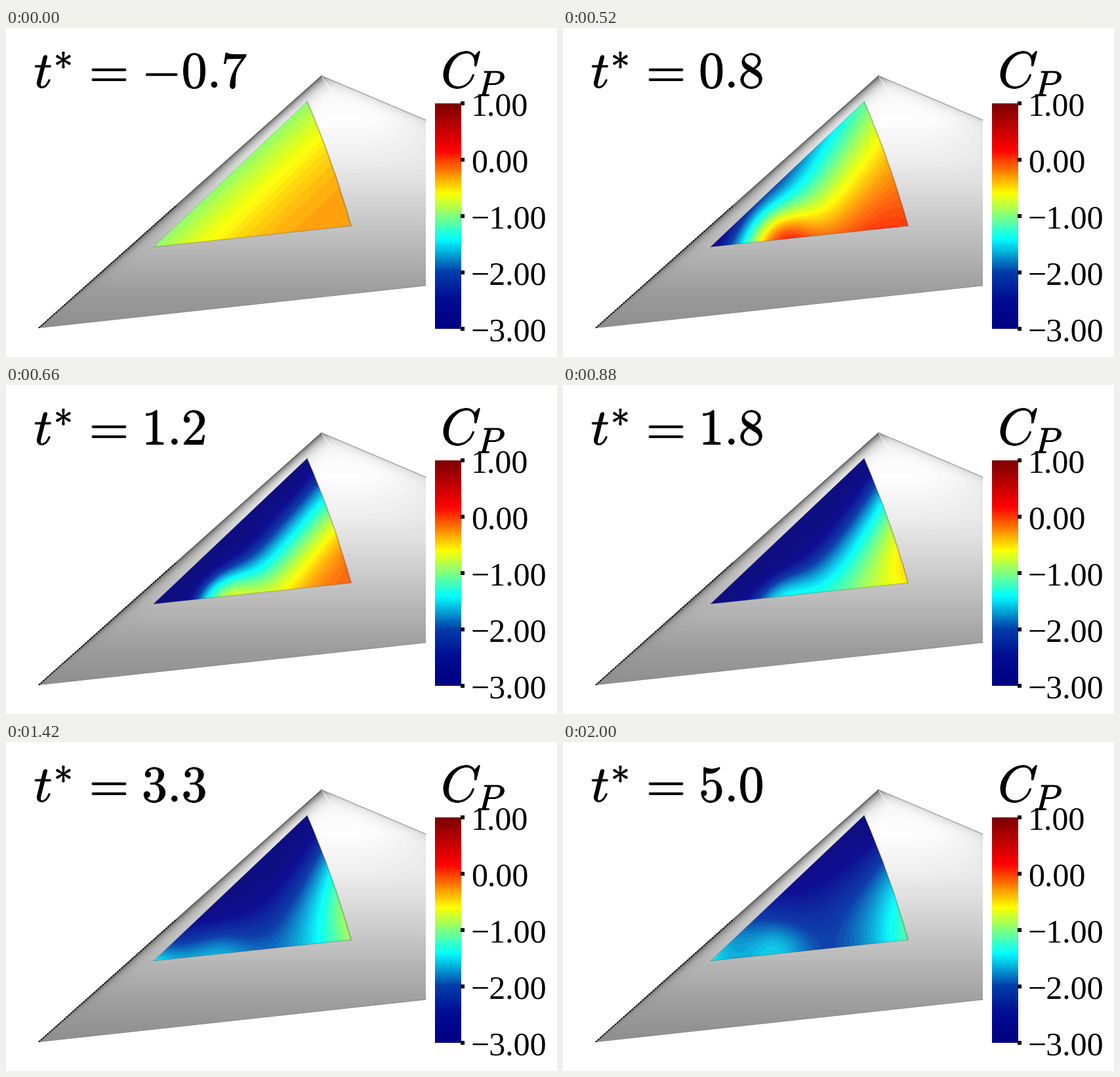
Write a matplotlib script that moves like this. It is 840 by 502 pixels and loops after 2020 ms.

```python
import numpy as np
import matplotlib.pyplot as plt
from matplotlib.animation import FuncAnimation
from matplotlib.colors import LinearSegmentedColormap
from matplotlib.patches import PathPatch, Polygon, Rectangle
from matplotlib.path import Path
from matplotlib.patheffects import withStroke

W, H, DPI = 840, 502, 64
FRAMES, STEP = 101, 20
T0, T1 = -0.7, 5.0
LO, HI = -3.0, 1.0
BAR_TOP, BAR_BOTTOM = 115, 459
PT = 72 / DPI

# Cone corners and sensor patch corners
APEX, TAIL, CUT_TOP, CUT_LOW = (481, 73), (50, 457.5), (640, 140.5), (640, 393)
A, B, C = (459, 112), (225, 334), (526, 302)

plt.rcParams["mathtext.fontset"] = "cm"

STOPS = {-3.0: "#000082", -2.5: "#000c91", -2.0: "#003eaa", -1.41: "#00ffff",
         -0.59: "#ffff00", 0.19: "#ff0000", 1.0: "#7f0000"}
cmap = LinearSegmentedColormap.from_list(
    "pressure", [((v - LO) / (HI - LO), c) for v, c in STOPS.items()], N=96)


def ramp(t, start, end):
    """Smooth step from 0 to 1."""
    x = np.clip((t - start) / (end - start), 0, 1)
    return x * x * (3 - 2 * x)


X0, X1, Y0, Y1 = 222, 530, 109, 338
gx, gy = np.meshgrid(np.arange(X0, X1) + .5, np.arange(Y0, Y1) + .5)

# Barycentric coordinates over the patch
to_bary = np.linalg.inv(np.array([[*A, 1], [*B, 1], [*C, 1]], float).T)
a, b, c = np.einsum("ij,jyx->iyx", to_bary, np.stack([gx, gy, np.ones_like(gx)]))
spot = np.exp(-((gx - 327) ** 2 + (gy - 323) ** 2) / (2 * 37 ** 2))


def pressure(t):
    """Corner pressures, bowed along each side, plus a spot on the lower side."""
    at_a = -.95 + .4 * ramp(t, -.7, .3) - 2.6 * ramp(t, .6, 1.2)
    at_b = (-.95 - .45 * ramp(t, -.7, .3) - 2.8 * ramp(t, .4, 1.2)
            + 2.75 * ramp(t, 1.2, 3))
    at_c = (-.31 - .26 * ramp(t, -.7, .3) + .55 * ramp(t, .3, .8)
            - .5 * ramp(t, .8, 2) - .6 * ramp(t, 1.2, 5))
    bow_ac = .2 + .6 * ramp(t, .8, 1.2) - .4 * ramp(t, 1.8, 5)
    bow_bc = .2 + .8 * ramp(t, .2, 1) - 1.8 * ramp(t, 1.2, 2.8)
    bow_ab = -ramp(t, 1.2, 2.4) + .8 * ramp(t, 2.7, 5.2)
    heat = ramp(t, -.7, .9) - .8 * ramp(t, 1.2, 2.4) + .3 * ramp(t, 2.8, 4)
    return (at_a * a + at_b * b + at_c * c + heat * spot
            + 4 * (bow_ac * a * c + bow_bc * b * c + bow_ab * a * b))


def patch_colours(t):
    level = (np.clip(pressure(t), LO, HI) - LO) / (HI - LO)
    return np.maximum(cmap(level)[..., :3], .055)


def body_shade():
    x, y = np.meshgrid(np.arange(W) + .5, np.arange(H) + .5)
    g = np.interp(y, [73, 140, 200, 400, 457], [248, 254, 238, 157, 142])
    g -= 14 * (np.maximum(x - 525, 0) / 115) ** 2 * np.clip((230 - y) / 80, 0, 1)
    left = ((x - 50) * 384 + (y - 457) * 431) / 577
    top = ((y - 73) * 159 - (x - 481) * 66) / 172
    width = 8 * np.clip((x - 50) / 250, .12, 1)
    g *= 1 - .58 * np.exp(-np.maximum(left, 0) / width)
    g *= 1 - .14 * np.exp(-np.maximum(top, 0) / 7)
    return np.round(g / 3) * 3


fig = plt.figure(figsize=(W / DPI, H / DPI), dpi=DPI, facecolor="white")
ax = fig.add_axes([0, 0, 1, 1])


def stroke(p, q, width, colour, **kw):
    ax.plot(*zip(p, q), color=colour, lw=width * PT, **kw)


def label(x, y, s, size, **kw):
    return ax.text(x, y, s, fontsize=size * PT, color="black", zorder=9, **kw)


def heading(x, y, s, size=78, **kw):
    bold = withStroke(linewidth=.9 * PT, foreground="black")
    return label(x, y, s, size, path_effects=[bold], **kw)


# Cone body
body = Polygon([APEX, CUT_TOP, CUT_LOW, TAIL], fc="none", ec="none")
ax.add_patch(body)
shade = ax.imshow(body_shade(), cmap="gray", vmin=0, vmax=255,
                  extent=(0, W, H, 0), interpolation="nearest")
shade.set_clip_path(body)
stroke(APEX, CUT_TOP, 1, "#8c8c8c")
stroke(TAIL, CUT_LOW, 1, "#8a8a8a")
stroke(TAIL, APEX, 1.2, "#5c5c5c")
stroke(TAIL, (260, 270.4), 1.8, "black", ls=(0, (1.2, 1.2)))
stroke((482, 75), (500, 101), 1.4, "white", alpha=.7)

# Coloured sensor patch with a bowed right side
outline = Path([A, (499, 204), C, B, A],
               [Path.MOVETO, Path.CURVE3, Path.CURVE3, Path.LINETO, Path.LINETO])
sensor = PathPatch(outline, fc="none", ec="none")
ax.add_patch(sensor)
picture = ax.imshow(patch_colours(T0), extent=(X0, X1, Y1, Y0),
                    interpolation="nearest")
picture.set_clip_path(sensor)
rim = Path(outline.vertices[:3], outline.codes[:3])
ax.add_patch(PathPatch(rim, fc="none", ec="black", alpha=.22, lw=2 * PT))
stroke(B, C, 1.2, "black", alpha=.2)
stroke(B, A, 1, "black", alpha=.12)

# Colour bar
ax.imshow(np.linspace(1, 0, BAR_BOTTOM - BAR_TOP)[:, None], cmap=cmap,
          vmin=0, vmax=1, extent=(654, 694, BAR_BOTTOM, BAR_TOP),
          interpolation="nearest")
for k in range(5):
    y = BAR_TOP + 86 * k
    ax.add_patch(Rectangle((693, y - 3), 6, 6, fc="black", ec="none"))
    label(709, y + 18, f"{HI - k:.2f}".replace("-", "\u2212"), 50,
          family="Liberation Serif")

# Headings
heading(663, 91, "$C$")
heading(718, 104, "$P$", 55)
heading(42.5, 91, "$t$")
heading(86.5, 47, r"$\ast$", 58, ha="center", va="center")
heading(113, 91, "$=$")
clock = heading(207, 91, "")

ax.set(xlim=(0, W), ylim=(H, 0), aspect="auto")
ax.axis("off")


def update(i):
    t = T0 + (T1 - T0) * i / (FRAMES - 1)
    clock.set_text(f"${round(t, 1) + 0.0:.1f}$")
    picture.set_data(patch_colours(t))
    return picture, clock


anim = FuncAnimation(fig, update, frames=FRAMES, interval=STEP,
                     repeat=True, repeat_delay=0)
plt.show()
```
